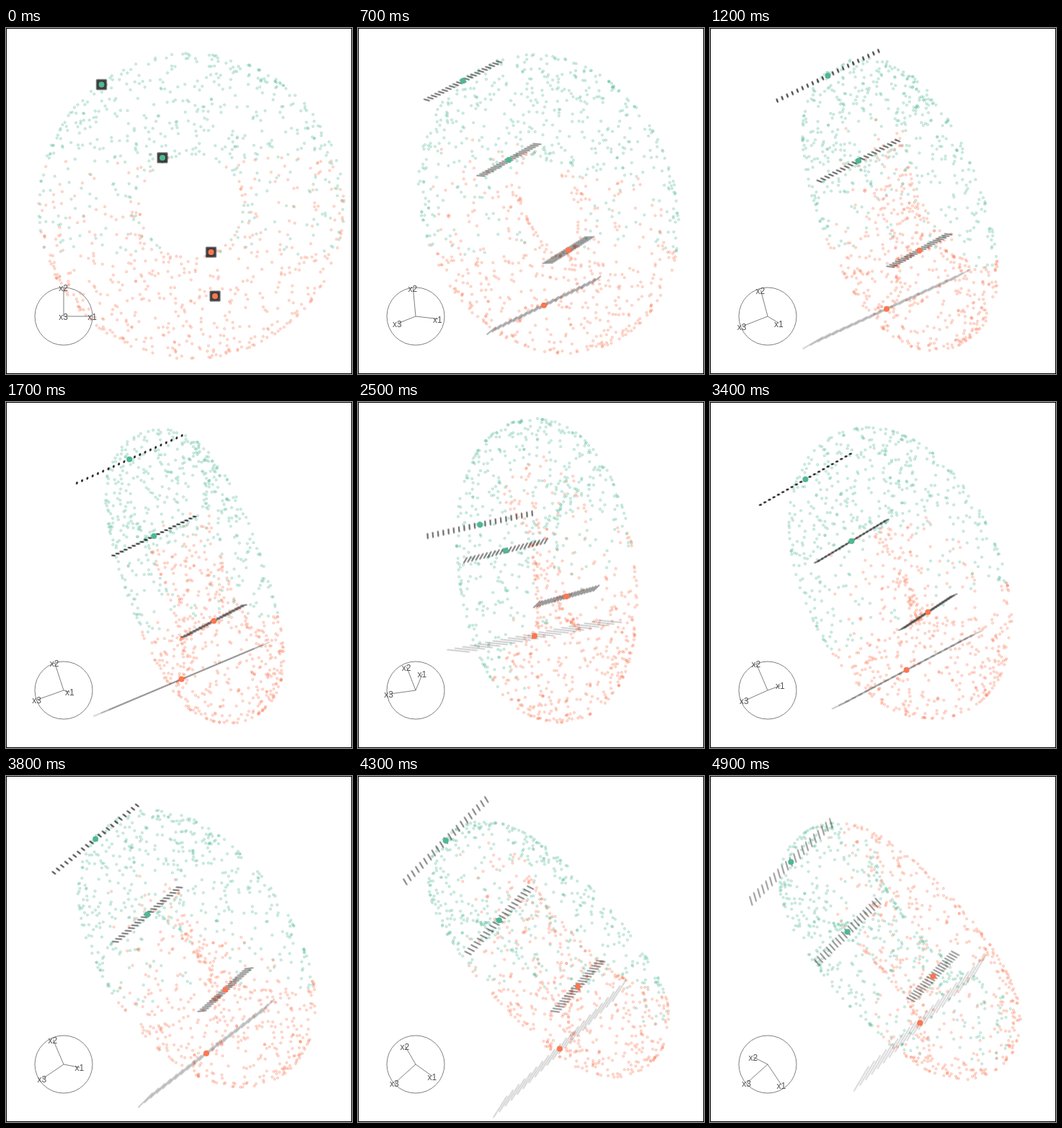
Recreate the animation shown at these times as an HTML page with a canvas. Size 480 by 480 pixels, loop 5000 ms.

```html
<!DOCTYPE html>
<html lang="en">
<head>
<meta charset="utf-8">
<title>Torus tour</title>
<style>
  html, body { margin: 0; height: 100%; overflow: hidden; background: #fff; }
  canvas { display: block; }
</style>
</head>
<body>
<canvas id="stage" width="480" height="480"></canvas>
<script>
const ctx = document.getElementById('stage').getContext('2d');
const TAU = Math.PI * 2, FRAME = 100, COUNT = 50;
const GREEN = '#4fb794', ORANGE = '#fb7650';
const RING = 142, TUBE = 70, CENTER = [17, -7, -17];

const dot = (a, b) => a[0] * b[0] + a[1] * b[1] + a[2] * b[2];
const add = (a, b, k = 1) => a.map((v, i) => v + b[i] * k);
const scale = (a, k) => a.map(v => v * k);
const unit = a => scale(a, 1 / Math.hypot(...a));

// View directions the tour visits, with the step at which each is reached
const path = [
  [0, [0, 0, 1]],
  [14, [.926, .365, .092]],
  [27, [.672, -.627, .387]],
  [34, [.88, .03, .474]],
  [40.6, [.727, .56, .385]],
  [49, [.5, .835, -.235]]
].map(([at, dir]) => ({ at, dir: unit(dir) }));

// Local planes: centre, colour, x3 change along x1 and along x2
const planes = [
  { at: [-107.5, 161.5, -5], color: GREEN, p: 2, q: 81 },
  { at: [-23, 60, 12], color: GREEN, p: -.8, q: 63 },
  { at: [44.5, -71, -18], color: ORANGE, p: -3, q: 47 },
  { at: [50, -132, 52], color: ORANGE, p: 18, q: 117 }
];
const HALF = 6.7, CELLS = 10;

let seed = 20;
function random() {
  seed = (seed * 1664525 + 1013904223) % 4294967296;
  return seed / 4294967296;
}

// Even spread over the torus surface
function torusPoint() {
  const a = random() * TAU, b = random() * TAU;
  const rho = RING + TUBE * Math.cos(b);
  if (random() * (RING + TUBE) > rho) return torusPoint();
  const p = [rho * Math.cos(a), rho * Math.sin(a), TUBE * Math.sin(b)];
  const green = Math.abs(p[1]) > 67 ? p[1] > 0 : p[0] * p[2] < 0;
  return { at: add(p, CENTER), color: green ? GREEN : ORANGE };
}
const cloud = Array.from({ length: 1000 }, torusPoint);

function slerp(a, b, k) {
  const w = Math.acos(dot(a, b));
  return scale(add(scale(a, Math.sin((1 - k) * w)), b, Math.sin(k * w)), 1 / Math.sin(w));
}

// Carries v, at right angles to a, along the shortest turn from a to b
const turn = (v, a, b) => add(v, add(a, b), -dot(v, b) / (1 + dot(a, b)));

function basis(step) {
  let rows = [[1, 0, 0], [0, 1, 0]];
  for (let i = 1; i < path.length && step > path[i - 1].at; i++) {
    const from = path[i - 1], to = path[i];
    const k = Math.min(1, (step - from.at) / (to.at - from.at));
    const dir = slerp(from.dir, to.dir, k);
    rows = rows.map(v => turn(v, from.dir, dir));
  }
  return rows;
}

function disc(x, y, r) {
  ctx.beginPath();
  ctx.arc(x, y, r, 0, TAU);
  ctx.fill();
}

function drawAxes(X, Y) {
  ctx.strokeStyle = '#7f7f7f';
  ctx.lineWidth = 1;
  ctx.beginPath();
  ctx.arc(80, 400, 40, 0, TAU);
  for (let i = 0; i < 3; i++) {
    ctx.moveTo(80, 400);
    ctx.lineTo(80 + 40 * X[i], 400 - 40 * Y[i]);
  }
  ctx.stroke();
  ctx.fillStyle = '#555';
  ctx.font = '12px "Liberation Sans", Arial, sans-serif';
  ctx.textAlign = 'center';
  for (let i = 0; i < 3; i++)
    ctx.fillText('x' + (i + 1), 79.5 + 40 * X[i], 405 - 40 * Y[i]);
}

function draw(step) {
  const [X, Y] = basis(step);
  const project = p => [240 + dot(X, p), 240 - dot(Y, p)];

  ctx.globalAlpha = 1;
  ctx.fillStyle = '#fff';
  ctx.fillRect(0, 0, 480, 480);

  ctx.globalAlpha = .25;
  ctx.lineWidth = 1;
  for (const { at, color } of cloud) {
    ctx.fillStyle = ctx.strokeStyle = color;
    disc(...project(at), 1.7);
    ctx.stroke();
  }

  ctx.globalAlpha = .11;
  ctx.fillStyle = '#000';
  for (const { at, p, q } of planes)
    for (let i = -CELLS; i <= CELLS; i++)
      for (let j = -CELLS; j <= CELLS; j++) {
        const u = i / CELLS, v = j / CELLS;
        disc(...project(add(at, [HALF * u, HALF * v, p * u - q * v])), 1.3);
      }

  ctx.globalAlpha = 1;
  for (const { at, color } of planes) {
    ctx.fillStyle = color;
    disc(...project(at), 4);
  }

  drawAxes(X, Y);
  ctx.strokeStyle = '#000';
  ctx.strokeRect(.5, .5, 479, 479);
}

let last = -1;
function tick() {
  const step = Math.floor(performance.now() / FRAME) % COUNT;
  if (step !== last) draw(last = step);
  requestAnimationFrame(tick);
}
tick();
</script>
</body>
</html>
```
